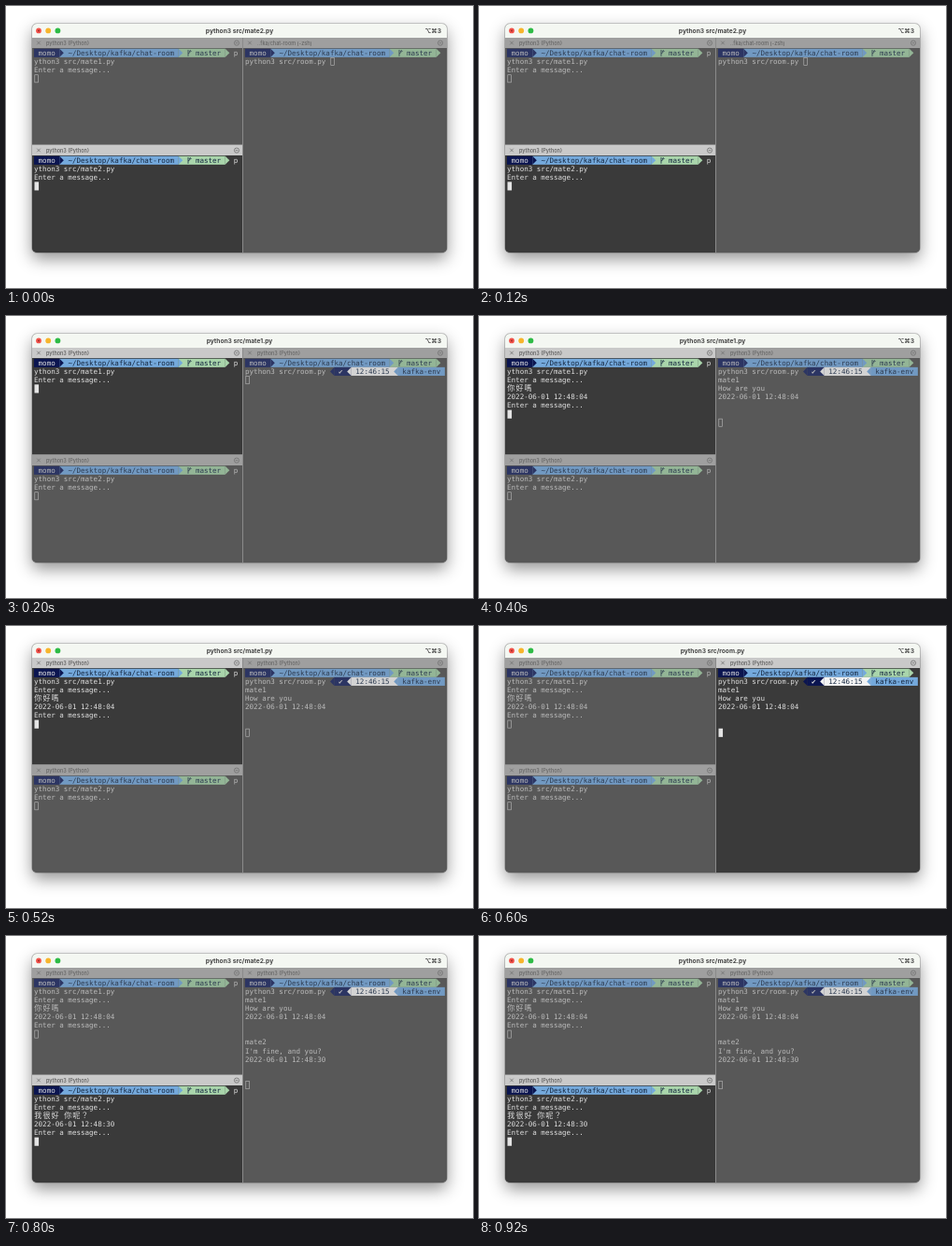
An HTML page for the animation above (1000 ms loop, 500 by 302 pixels).

```html
<!DOCTYPE html>
<html lang="en">
<head>
<meta charset="utf-8">
<title>Chat room terminal</title>
<style>
  html, body { margin: 0; width: 100%; height: 100%; overflow: hidden; background: #fff; }
  svg { display: block; width: 100%; height: 100%; }
  text { white-space: pre; }
  .mono { font: 7.56px "DejaVu Sans Mono", "Noto Sans CJK TC", "Noto Sans CJK", monospace; }
  .cjk { font: 8px "Noto Sans CJK TC", "Noto Sans CJK", sans-serif; }
  .title { font: 700 6.65px Inter, "DejaVu Sans", sans-serif; fill: #444; }
  .tab { font: 500 5.5px Inter, sans-serif; }
  .shadow { filter: drop-shadow(0 7px 8.5px rgba(0, 0, 0, .42)); }
</style>
</head>
<body>
<svg viewBox="0 0 500 302">
  <defs><clipPath id="frame"><rect x="28" y="19" width="444" height="245" rx="5"/></clipPath></defs>
  <rect class="shadow" x="28" y="19" width="444" height="245" rx="5" fill="#585858"/>
  <rect x="27.6" y="18.6" width="444.8" height="245.8" rx="5.4" fill="none" stroke="#000" stroke-opacity=".2"/>
  <g id="stage" clip-path="url(#frame)"></g>
</svg>
<script>
const STEP = 200, STEPS = 5;
const CELL = 4.55, ROW = 9.1;
const stage = document.getElementById('stage');

const BRIGHT = {
  back: '#3a3a3a', bar: '#c9c9c9', label: '#565656', text: '#e0e0e0', ink: '#14263f',
  navy: '#0b1550', blue: '#74a9dc', green: '#a9d5ab', white: '#f4f4f4'
};
const DIM = {
  back: '#585858', bar: '#9f9f9f', label: '#646464', text: '#bababa', ink: '#2d3b50',
  navy: '#2c3563', blue: '#7199c2', green: '#93b596', white: '#d3d3d3'
};

const rect = (x, y, w, h, fill, more = '') =>
  `<rect x="${x}" y="${y}" width="${w}" height="${h}" fill="${fill}" ${more}/>`;
const path = (d, more) => `<path d="${d}" ${more}/>`;
const circle = (x, y, r, more) => `<circle cx="${x}" cy="${y}" r="${r}" ${more}/>`;
const label = (x, y, str, cls, more = '') => `<text x="${x}" y="${y}" class="${cls}" ${more}>${str}</text>`;

// Character grid whose first cell starts at (x0, y0)
function makeGrid(x0, y0, pal) {
  const cx = col => x0 + col * CELL;
  const cy = row => y0 + row * ROW;
  const text = (col, row, str, fill = pal.text) =>
    label(cx(col), cy(row) + 7, str, 'mono', `fill="${fill}"`);

  // Wide characters take two cells each
  function wide(row, str) {
    let col = 0, out = '';
    for (const ch of str) {
      if (ch === ' ') { col++; continue; }
      out += label(cx(col) + .3, cy(row) + 7.3, ch, 'cjk', `fill="${pal.text}"`);
      col += 2;
    }
    return out;
  }

  const block = (from, to, row, fill) => rect(cx(from), cy(row), (to - from) * CELL, ROW, fill);

  function arrow(col, row, fill, dir) {
    const base = cx(dir > 0 ? col : col + 1), tip = base + dir * CELL, y = cy(row);
    return path(`M${base} ${y}L${tip} ${y + ROW / 2}L${base} ${y + ROW}Z`, `fill="${fill}"`);
  }

  function prompt() {
    const bx = cx(36) + 1.2, by = cy(0);
    return block(0, 6, 0, pal.navy) + block(6, 34, 0, pal.blue) + block(34, 45, 0, pal.green) +
      arrow(6, 0, pal.navy, 1) + arrow(34, 0, pal.blue, 1) + arrow(45, 0, pal.green, 1) +
      text(1, 0, 'momo') +
      text(8, 0, '~/Desktop/kafka/chat-room', pal.ink) +
      path(`M${bx} ${by + 1.2}v6.8M${bx} ${by + 5.2}q2.3 -.5 2.3 -3.2m-1.1 1l1.1 -1.2l1.1 1.2`,
        `fill="none" stroke="${pal.ink}" stroke-width=".8"`) +
      text(38, 0, 'master', pal.ink);
  }

  function status() {
    return block(21, 25, 1, pal.navy) + block(25, 36, 1, pal.white) + block(36, 47, 1, pal.blue) +
      arrow(20, 1, pal.navy, -1) + arrow(24, 1, pal.white, -1) + arrow(35, 1, pal.blue, -1) +
      text(22, 1, '✔') + text(26, 1, '12:46:15', pal.ink) + text(37, 1, 'kafka-env', pal.ink);
  }

  function cursor(col, row, solid) {
    const x = cx(col), y = cy(row) + .3;
    return solid ? rect(x + .5, y, CELL, ROW, '#e4e4e4')
      : rect(x + .8, y + .4, CELL - .7, ROW - 1, 'none', `stroke="${pal.text}" stroke-width=".6"`);
  }

  const line = (row, str) => /[^\x00-\x7f]/.test(str) ? wide(row, str) : text(0, row, str);
  return { text, line, prompt, status, cursor };
}

function pane({ x, y, w, h, name, lines, col = 0, row, active, wraps, status }) {
  const pal = active ? BRIGHT : DIM;
  const grid = makeGrid(x + 2, y + 11.75, pal);
  const thin = `fill="none" stroke="${pal.label}" stroke-width=".6"`;
  const ix = x + (wraps ? 219 : 211);
  return rect(x, y, w, h, pal.back) + rect(x, y, w, 11, pal.bar) +
    path(`M${x + 5.2} ${y + 3.7}l3.6 3.6m0 -3.6l-3.6 3.6`, thin) +
    label(x + 15, y + 7.6, name, 'tab', `fill="${pal.label}"`) +
    circle(ix, y + 5.6, 2.6, thin) +
    path(`M${ix - 1.4} ${y + 5.6}h2.8`, thin) +
    grid.prompt() + (wraps ? grid.text(47, 0, 'p') : '') +
    (status ? grid.status() : '') +
    lines.map((str, i) => grid.line(i + 1, str)).join('') +
    grid.cursor(col, row ?? lines.length + 1, active);
}

function titleBar(file) {
  const lights = ['#f2524a', '#f7b52c', '#2dbb45'];
  return rect(28, 19, 444, 15, '#f4f7f2') +
    lights.map((c, i) => circle(35 + i * 10.2, 26.4, 2.9, `fill="${c}"`)).join('') +
    circle(35, 26.4, 1, 'fill="#a02a24"') +
    label(250, 29, `python3 src/${file}.py`, 'title', 'text-anchor="middle"') +
    label(466, 29, '⌥⌘3', 'title', 'text-anchor="end"');
}

function scene(step) {
  const focus = ['mate2', 'mate1', 'mate1', 'room', 'mate2'][step];
  const ask = 'Enter a message...';
  const early = '2022-06-01 12:48:04', late = '2022-06-01 12:48:30';
  const started = step >= 1, asked = step >= 2, answered = step >= 4;

  const first = ['ython3 src/mate1.py', ask];
  const second = ['ython3 src/mate2.py', ask];
  const room = ['python3 src/room.py'];
  if (asked) {
    first.push('你好嗎', early, ask);
    room.push('mate1', 'How are you', early, '', '');
  }
  if (answered) {
    second.push('我很好 你呢？', late, ask);
    room.push('mate2', "I'm fine, and you?", late, '', '');
  }

  const left = { x: 28, w: 225, h: 115, name: 'python3 (Python)', wraps: true };
  return titleBar(focus) +
    pane({ ...left, y: 34, lines: first, active: focus === 'mate1' }) +
    pane({ ...left, y: 149, lines: second, active: focus === 'mate2' }) +
    pane({
      x: 254, y: 34, w: 218, h: 230, lines: room, active: focus === 'room', status: started,
      name: started ? 'python3 (Python)' : '..fka/chat-room (-zsh)',
      col: started ? 0 : 20, row: started ? undefined : 1
    }) +
    rect(253, 34, 1, 230, '#8a8a8a') + rect(28, 148, 225, 1, '#8a8a8a');
}

let shown = -1;
function draw(ms) {
  const step = Math.floor(ms / STEP) % STEPS;
  if (step === shown) return;
  shown = step;
  stage.innerHTML = scene(step);
}

const start = performance.now();
function tick() {
  draw(performance.now() - start);
  requestAnimationFrame(tick);
}
tick();
</script>
</body>
</html>
```
